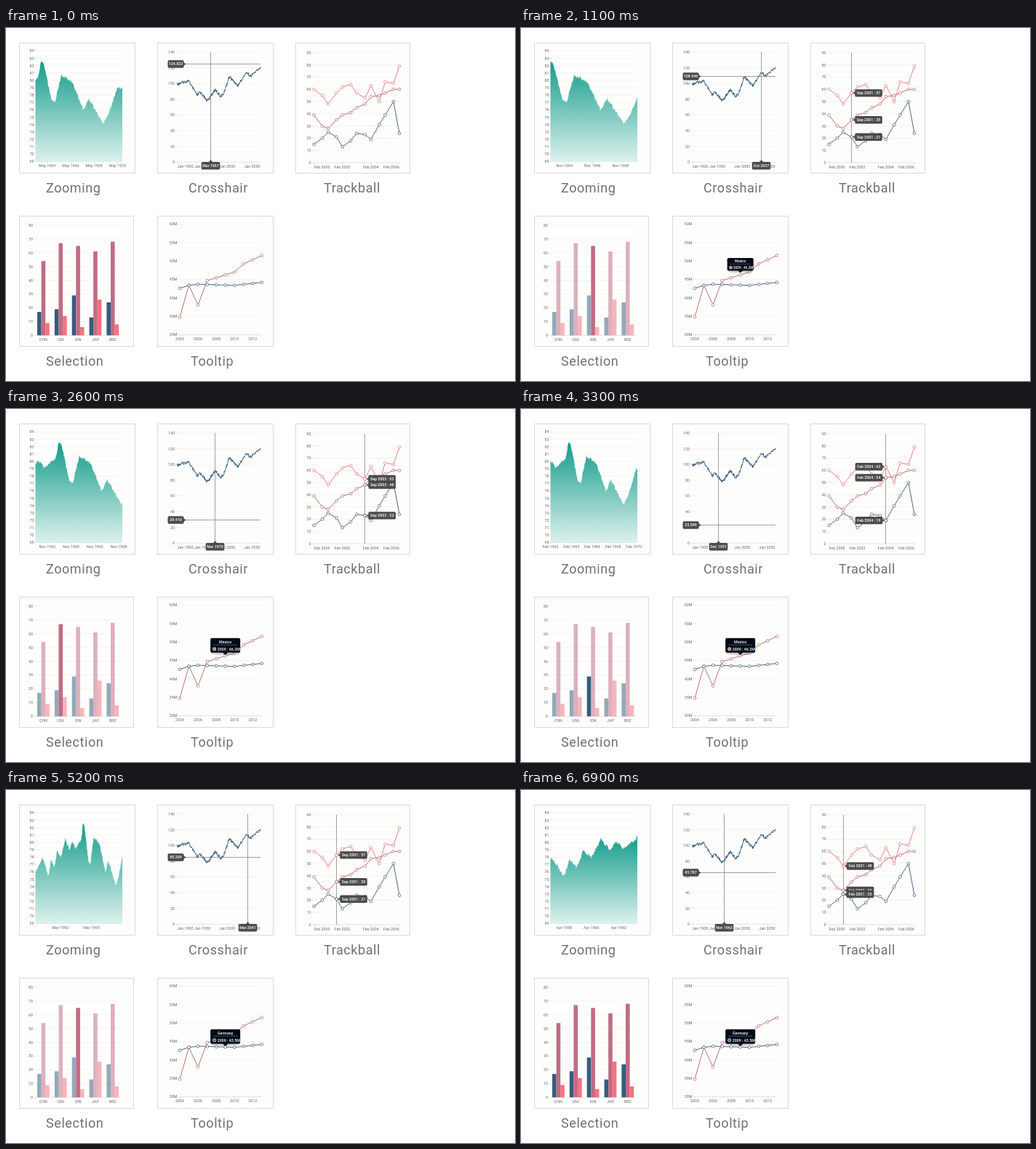
Animation, 700 px wide and 485 px high, one loop 7000 ms. Source, as an HTML page:

```html
<!DOCTYPE html>
<html lang="en">
<head>
<meta charset="utf-8">
<title>Chart interactions</title>
<style>
  html, body { margin: 0; width: 100%; height: 100%; overflow: hidden; background: #fff; }
  svg { display: block; width: 700px; height: 485px; font: 5.3px Roboto, sans-serif; }
  .title { font-size: 18px; letter-spacing: .58px; fill: #707070; }
  .axis { fill: #686868; }
  .tip { fill: #fff; font-weight: 500; }
</style>
</head>
<body>
<svg viewBox="0 0 700 485">
  <defs>
    <linearGradient id="teal" x1="0" y1="0" x2="0" y2="1">
      <stop offset="0" stop-color="#129b8a"/>
      <stop offset="1" stop-color="#dcf1ed"/>
    </linearGradient>
  </defs>
  <g id="base"></g>
  <g id="live"></g>
</svg>
<script>
const LOOP = 7000, STEP = 100;
const NAVY = '#355c7d', MAUVE = '#c06c84', CORAL = '#f67280';
const LABEL = '#4b4b4b', CURSOR = '#8a8a8a', POPUP = '#000a17';
const NAVY_LINE = '#3f5673', MAUVE_LINE = '#b8606f', CORAL_LINE = '#ee7282';
const MONTHS = 'Jan Feb Mar Apr May Jun Jul Aug Sep Oct Nov Dec'.split(' ');

// Shared helpers
const range = (from, to, step = 1) =>
  Array.from({ length: Math.round((to - from) / step) + 1 }, (_, i) => from + i * step);
const noise = i => { const v = Math.sin(i * 12.9898) * 43758.5453; return (v - Math.floor(v)) * 2 - 1; };
const snap = v => Math.floor(v) + .5;
const monthYear = year => `${MONTHS[Math.floor(year % 1 * 12)]} ${Math.floor(year)}`;

// Linear interpolation through rows of [position, ...values]
function tween(rows, at) {
  const next = rows.findIndex(r => r[0] > at);
  if (next < 0) return rows[rows.length - 1].slice(1);
  if (next === 0) return rows[0].slice(1);
  const a = rows[next - 1], b = rows[next], k = (at - a[0]) / (b[0] - a[0]);
  return a.slice(1).map((v, i) => v + (b[i + 1] - v) * k);
}

// Shapes
const text = (s, x, y, anchor = 'middle', cls = 'axis') =>
  `<text class="${cls}" x="${x}" y="${y + 1.9}" text-anchor="${anchor}">${s}</text>`;
const line = (x1, y1, x2, y2, color, w = .6) =>
  `<path d="M${x1} ${y1}L${x2} ${y2}" stroke="${color}" stroke-width="${w}"/>`;
const rect = (x, y, w, h, fill, more = '') =>
  `<rect x="${x}" y="${y}" width="${w}" height="${h}" fill="${fill}" ${more}/>`;
const coords = pts => pts.map(p => p.map(v => v.toFixed(2))).join(' ');
const poly = (pts, color) =>
  `<polyline points="${coords(pts)}" fill="none" stroke="${color}" stroke-width=".9" stroke-linejoin="round"/>`;
const shape = (pts, fill) => `<polygon points="${coords(pts)}" fill="${fill}"/>`;
const dots = (pts, color) => pts.map(([x, y]) =>
  `<circle cx="${x}" cy="${y}" r="1.9" fill="#fff" stroke="${color}" stroke-width=".7"/>`).join('');
const series = (pts, color) => poly(pts, color) + dots(pts, color);
const badge = (s, cx, cy, w) =>
  rect(cx - w / 2, cy - 5.2, w, 10.4, LABEL, 'rx="1.6"') + text(s, cx, cy, 'middle', 'tip');

function card(x, y, w, title, titleX) {
  return rect(x, y, w, 179, '#fdfefc', 'stroke="#dadada"') +
    `<text class="title" x="${titleX}" y="${y + 205.5}">${title}</text>`;
}
function valueAxis(values, toY, left, right, unit = '') {
  return values.map((v, i) => line(left, toY(v), right, toY(v), i ? '#ececec' : '#d2d2d2') +
    line(left - 2, toY(v), left, toY(v), '#d2d2d2') +
    text(v + unit, left - 3.5, toY(v), 'end')).join('');
}
const ticks = (xs, y) => xs.map(x => line(x, y, x, y + 2, '#cfcfcf')).join('');

// Zooming: turning points of the curve (year, value) plus jitter
const zoomY = v => 183.5 - (v - 69) * 10.133;
const zoomCurve = [
  [1950, 79.5], [1950.9, 77.7], [1951.4, 80.2], [1952.1, 78.8], [1953.45, 82.9], [1954.5, 79.2],
  [1956, 75.6], [1957.35, 78], [1958.27, 75.4], [1958.7, 77.7], [1959.2, 76.6], [1959.7, 78.9],
  [1960.25, 78], [1961, 80.4], [1961.7, 78.9], [1962.1, 80.2], [1962.6, 79.2], [1963.55, 80.4],
  [1963.84, 82.6], [1964.1, 82], [1964.7, 77.3], [1965, 77.1], [1965.55, 80.7], [1966.5, 79.8],
  [1967.4, 76], [1967.9, 77.5], [1969.05, 74.2], [1969.6, 75.5], [1970.3, 79], [1971, 79],
  [1971.8, 74.8], [1972.8, 79], [1973.55, 80.8]];
const zoomKeys = [
  [0, 1963.34, 1970.75], [1100, 1963.85, 1970.05], [1900, 1961.62, 1967.9],
  [3300, 1962.1, 1970.43], [4000, 1950.18, 1973.55], [4800, 1950.18, 1973.55],
  [5200, 1956.18, 1970.15], [6900, 1957.28, 1963.65]];
function zooming(t) {
  const [start, end] = tween(zoomKeys, t), left = 40.5, right = 160;
  const toX = year => left + (year - start) / (end - start) * (right - left);
  const valueAt = year => tween(zoomCurve, year)[0] + noise(Math.round(year * 24)) * .25;
  const inside = range(Math.ceil(start * 24), Math.floor(end * 24)).map(i => i / 24);
  const edge = [start, ...inside, end].map(year => [toX(year), zoomY(valueAt(year))]);

  // Labels sit on round years, shifted by the month the window starts in
  const gap = end - start > 10 ? 5 : 2, part = start % 1;
  const first = Math.ceil(Math.floor(start) / gap) * gap + part + 1e-6;
  let labels = '';
  for (let year = first; year < end; year += gap) {
    labels += ticks([toX(year)], 183.5) + text(monthYear(year), toX(year), 189.5);
  }
  return shape([[left, 183.5], ...edge, [right, 183.5]], 'url(#teal)') + labels;
}

// Crosshair
const crossY = v => 184.3 - v * 1.0807;
const crossCurve = [
  [235, 77], [251, 72.5], [263, 92.5], [267, 88], [277, 100], [288, 84.5], [295, 94],
  [299, 91], [307, 67], [319, 79], [331, 60.5], [336, 66.5], [350, 54]];
const crossKeys = [
  [0, 281.5, 124.823], [1100, 330.15, 108.946], [1900, 303.93, 35.422], [3300, 271, 23.399],
  [4200, 317.3, 59.314], [5200, 332.5, 85.209], [6900, 279.22, 65.787]];
function crosshair(t) {
  const [at, value] = tween(crossKeys, t);
  const x = snap(at), y = snap(crossY(value)), year = 1951.95 + (at - 271) * 1.451;
  return line(235, y, 350, y, CURSOR, .8) + line(x, 33, x, 184, CURSOR, .8) +
    shape([[244, y - 2.4], [247.5, y], [244, y + 2.4]], LABEL) +
    badge(value.toFixed(3), 233.5, y, 22) +
    shape([[x - 2.6, 184.3], [x, 181], [x + 2.6, 184.3]], LABEL) +
    badge(monthYear(year), x, 189.2, 25.6);
}

// Trackball: points alternate between February and September
const ballX = i => 423.5 + (Math.floor(i / 2) * 12 + i % 2 * 7) * 1.632;
const ballY = v => 185 - v * 1.678;
const balls = [
  [CORAL_LINE, [60, 55, 48, 57, 62, 64, 57, 53, 63, 50, 66, 65, 79]],
  [MAUVE_LINE, [39, 30, 28, 35, 39, 41, 45, 48, 54, 55, 57, 60, 60]],
  [NAVY_LINE, [15, 20, 25, 21, 13, 18, 24, 23, 19, 31, 39, 50, 24]]];
const ballKeys = [[500, 1], [1100, 3], [1900, 6], [3300, 8], [4200, 6], [5200, 3], [6400, 2]];
function trackball(t) {
  if (t < 500) return '';
  const i = Math.round(tween(ballKeys, t)[0]), x = ballX(i), side = x + 43 > 541 ? -1 : 1;
  const date = `${i % 2 ? 'Sep' : 'Feb'} ${2000 + Math.floor(i / 2)}`;
  return line(snap(x), 34, snap(x), 185, CURSOR, .8) + balls.map(([color, values]) => {
    const y = ballY(values[i]), root = x + side * 5.1;
    return dots([[x, y]], color) +
      shape([[root, y - 2.4], [x + side * 2, y], [root, y + 2.4]], LABEL) +
      badge(`${date} : ${values[i]}`, x + side * 23.5, y, 37.5);
  }).join('');
}

// Selection: rows of picks are [time, group, bar]
const barY = v => 422.3 - v * 1.891;
const groups = [['CHN', 17, 54, 9], ['USA', 19, 67, 14], ['IDN', 29, 65, 6], ['JAP', 13, 61, 26], ['BRZ', 24, 68, 8]];
const picks = [[0, -1, -1], [500, 2, 1], [1500, 1, 1], [3300, 2, 0], [3900, 3, 2], [4700, 2, 1], [6500, -1, -1]];
function selection(t) {
  const [, group, bar] = picks.filter(p => p[0] <= t).pop();
  return groups.map(([, ...values], g) => values.map((v, b) => {
    const lit = group < 0 || (g === group && b === bar);
    return rect(43 + g * 23.85 + b * 5.6, barY(v), 5.6, 422.3 - barY(v),
      [NAVY, MAUVE, CORAL][b], `opacity="${lit ? 1 : .52}"`);
  }).join('')).join('');
}

// Tooltip: yearly values from 2004, in millions
const popX = i => 239 + i * 12.53;
const popY = v => 421.5 - (v - 30) * 5.067;
const germany = [[0, 42.6], [1, 43.4], [2, 43.7], [6, 43.4], [9, 44.2]];
const mexico = [[0, 34.8], [1, 43.4], [2, 38.1], [3, 44.7], [6, 47], [7, 49.2], [9, 51.5]];
const yearly = curve => range(0, 9).map(i => [popX(i), popY(tween(curve, i)[0])]);
const popups = [[1000, 4000, 'Mexico', MAUVE, mexico], [5000, LOOP, 'Germany', NAVY, germany]];
function tooltip(t) {
  const shown = popups.find(([from, to]) => t >= from && t < to);
  if (!shown) return '';
  const [from, , name, color, curve] = shown, value = tween(curve, 5)[0];
  const scale = Math.min(1, .4 + (t - from) * .0048);
  return `<g transform="translate(${popX(5)} ${popY(value) - 14.5}) scale(${scale})">` +
    '<ellipse cy="11.2" rx="20" ry="2" fill="#000" opacity=".18"/>' +
    rect(-20.5, -10, 41, 20, POPUP, 'rx="2"') +
    shape([[-4, 9.8], [0, 13], [4, 9.8]], POPUP) +
    text(name, 0, -5, 'middle', 'tip') +
    line(-16.5, -.6, 16.5, -.6, '#8b9098', .5) +
    `<circle cx="-15" cy="5" r="2.1" fill="${color}" stroke="#fff" stroke-width=".8"/>` +
    text(`2009 : ${value.toFixed(1)}M`, 4.6, 5, 'middle', 'tip') + '</g>';
}

function drawBase() {
  const jagged = range(235, 350, .4).map((x, i) => [x, tween(crossCurve, x)[0] + noise(i + 7) * 2.2]);
  return [
    card(18.5, 20.5, 159, 'Zooming', 55),
    valueAxis(range(69, 84), zoomY, 42, 160),
    card(208.5, 20.5, 159, 'Crosshair', 251),
    valueAxis(range(0, 140, 20), crossY, 235.5, 350),
    ticks(range(235.4, 338.6, 34.4), 184),
    text('Jan 1900', 235.5, 190, 'start'), text('Jan 1950', 270, 190),
    text('Jan 2000', 304.3, 190), text('Jan 2050', 338.5, 190),
    poly(jagged, NAVY),
    card(398.5, 20.5, 157, 'Trackball', 437),
    valueAxis(range(0, 90, 10), ballY, 423, 541.5),
    ticks(range(0, 12, 4).map(ballX), 185),
    text('Feb 2000', 423.5, 191, 'start'), text('Feb 2002', 462.5, 191),
    text('Feb 2004', 501.8, 191), text('Feb 2006', 541, 191, 'end'),
    ...balls.map(([color, values]) => series(values.map((v, i) => [ballX(i), ballY(v)]), color)),
    card(18.5, 258.5, 157, 'Selection', 55),
    valueAxis(range(0, 80, 10), barY, 40.5, 158),
    ...groups.map(([name], g) => text(name, 51.4 + g * 23.85, 428.5)),
    card(208.5, 258.5, 159, 'Tooltip', 254),
    valueAxis(range(30, 60, 5), popY, 238.8, 352, 'M'),
    ...range(0, 8, 2).map(i => ticks([popX(i)], 421.5) + text(2004 + i, popX(i), 427.5)),
    series(yearly(mexico), MAUVE_LINE), series(yearly(germany), NAVY_LINE)
  ].join('');
}

const live = document.getElementById('live');
document.getElementById('base').innerHTML = drawBase();
let shownAt = -1;
function render(now) {
  const t = Math.floor(now % LOOP / STEP) * STEP;
  if (t !== shownAt) {
    shownAt = t;
    live.innerHTML = [zooming, crosshair, trackball, selection, tooltip].map(part => part(t)).join('');
  }
  requestAnimationFrame(render);
}
render(0);
</script>
</body>
</html>
```
